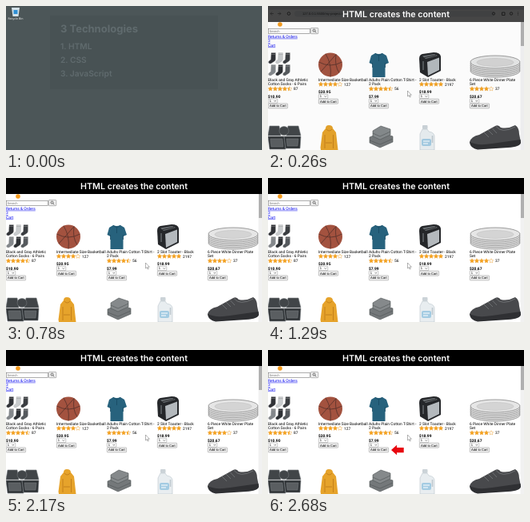
Recreate the animation shown at these times as an HTML page. Size 320 by 180 pixels, loop 2.81 s.

```html
<!DOCTYPE html>
<html lang="en">
<head>
<meta charset="utf-8">
<title>HTML creates the content</title>
<style>
html, body { margin: 0; width: 100%; height: 100%; overflow: hidden; background: #4c5658; }
svg { display: block; width: 100%; height: 100%; }
text { font: 4.9px Roboto, sans-serif; text-rendering: geometricPrecision; }
.title { font: 600 10.7px Inter, sans-serif; fill: #fff; text-anchor: middle; }
.slide { font: 600 10.2px Inter, sans-serif; fill: #606b6e; }
.slide.head { font-size: 13px; font-weight: 700; }
.link { fill: #00e; text-decoration: underline; }
.price { font-weight: 700; }
.ui { font: 4.1px "Liberation Sans", Arial, sans-serif; }
.icon { font: 3.6px "Open Sans", sans-serif; fill: #fff; text-anchor: middle; }
</style>
</head>
<body>
<svg viewBox="0 0 320 180" preserveAspectRatio="none">
  <rect width="320" height="180" fill="#4c5658"/>
  <g id="slide">
    <rect x="55" y="12" width="210" height="92" fill="#485254"/>
    <text class="slide head" x="68" y="33">3 Technologies</text>
    <text class="slide" x="68" y="54">1. HTML</text>
    <text class="slide" x="68" y="71">2. CSS</text>
    <text class="slide" x="68" y="88">3. JavaScript</text>
  </g>
  <path d="M7 2H17L15.500 13H8.500Z" fill="#d3e1e8"/>
  <rect x="9.500" y="5" width="5" height="5" fill="#2f8fd4"/>
  <text class="icon" x="12" y="17.200">Recycle Bin</text>

  <g id="page" opacity="0">
    <rect width="320" height="180" fill="#fff"/>
    <rect width="320" height="20" fill="#dee1e6"/>
    <rect y="4.500" width="320" height="15.500" fill="#fff"/>
    <rect x="33" y="6" width="250" height="7.500" rx="3.700" fill="#eceff2"/>
    <text class="ui" x="43" y="11.300" fill="#444">127.0.0.1:5500/my-project.html</text>
    <path d="M7 9.500H3M5 7.500L3 9.500L5 11.500M12 9.500H16M14 7.500L16 9.500L14 11.500" fill="none" stroke="#777" stroke-width=".7"/>
    <g fill="none" stroke="#444" stroke-width=".8"><circle cx="26" cy="9.500" r="1.800"/><circle cx="282" cy="9.500" r="1.600"/><path d="M292.500 8H296V11.500H292.500Z"/><circle cx="304" cy="9.500" r="1.700"/><path d="M312.500 7.500V11.500" stroke-dasharray=".8"/></g>
    <rect x="315.500" y="20" width="4.500" height="160" fill="#f1f1f1"/>
    <rect x="316" y="20" width="4" height="30" fill="#b0b0b0"/>
    <circle cx="15" cy="23" r="2.800" fill="#f59a1b"/>

    <rect x=".3" y="28.300" width="52" height="6.300" fill="#fff" stroke="#777" stroke-width=".6"/>
    <text class="ui" x="1.500" y="33" fill="#757575">Search</text>
    <rect x="53.300" y="27.500" width="9.500" height="7.200" rx=".8" fill="#efefef" stroke="#777" stroke-width=".5"/>
    <g fill="none" stroke="#333" stroke-width=".7"><circle cx="57.600" cy="30.600" r="1.500"/><path d="M58.700 31.700L60.300 33.300"/></g>
    <text class="link" x="0" y="39.700">Returns &amp; Orders</text>
    <text class="link" x="0" y="45.300">3</text>
    <text class="link" x="0" y="50.600">Cart</text>

    <g id="products"></g>

    <g id="socks"></g>

    <circle cx="78" cy="73.500" r="15" fill="#a3523f"/>
    <path d="M63.500 70Q78 78 92.500 70M66 82Q77 70 85 60.500M72 59.800Q80 73 78 88.500M85 60.500Q83 75 89 83.500" fill="none" stroke="#55302a" stroke-width=".8"/>

    <path d="M134 59Q138.500 61 143 59L148 62L151 71L146.500 73V89H130.500V73L126.500 71L129 62Z" fill="#27627d"/>
    <path d="M134 59Q138.500 64 143 59M138.500 62V69M130.500 71V77M146.500 71V77" fill="none" stroke="#174a62" stroke-width=".8"/>

    <path d="M189 66Q189 61 193 60L207 58Q215 58 216 63V81L200 89L190 83Z" fill="#25272a"/>
    <path d="M193 62.500L208 60L212 62L197 66Z" fill="#6b7074"/>
    <path d="M199 70L214 64.500V80L200 87Z" fill="#b4b9bd"/>
    <path d="M195.500 64.500L210 61.500" stroke="#222" stroke-width=".9"/>
    <path d="M194 69V80" stroke="#8b9094" stroke-width=".9"/>

    <g id="plates"></g>

    <g stroke="#73787b" stroke-width=".6" fill="#414548">
      <path d="M2 150H14L16 162H0ZM25 150H38L41 162H23Z"/>
      <ellipse cx="20" cy="156" rx="6" ry="5.500"/>
      <path d="M0 163H20L22 179H2ZM20 163H41L40 178H22Z" fill="#2f3336"/>
      <path d="M3 166H18L19 176H4ZM23 166H38L37 175H24Z" fill="#5a5e61"/>
    </g>

    <path d="M72 153Q72 149 76 149Q81 149 81 153L85 158L87.500 180H66L65.500 177L68 158Z" fill="#e6a32b"/>
    <path d="M73 154Q76.500 158 80 154M71 161V178M81.500 161V178M72 171H80" fill="none" stroke="#bc7817" stroke-width=".8"/>

    <g fill="#74787a" stroke="#505457" stroke-width=".6" stroke-linejoin="round">
      <path d="M127 164L142 158L156 163V170L140 177L127 171Z"/>
      <path d="M131 156L141 150L153 154V161L140 167L131 163Z" fill="#85898b"/>
      <path d="M127 168L140 173L156 166M131 159L140 163L153 157" fill="none"/>
    </g>

    <path d="M193 154H199L201 157Q209 158 208 165V180H190V160Z" fill="#e8edf0" stroke="#b9c4cb" stroke-width=".6"/>
    <rect x="193" y="149" width="6.500" height="5" rx="1" fill="#cbd3d8"/>
    <rect x="192" y="166" width="12" height="9" rx="2" fill="#a3cbe2"/>
    <path d="M194 169H202M194 172H200" stroke="#fff"/>
    <path d="M205.500 162V171" stroke="#bec9cf" stroke-width="1.600"/>

    <path d="M252 170Q254 163 264 161L284 150Q288 148 291 152Q300 154 309 149Q314 152 314 160L316 170Q315 175 300 176L262 179Q253 177 252 170Z" fill="#48494c"/>
    <path d="M252 170Q262 175 280 172L315.500 167L316 171Q315 176 300 177L262 179.500Q253 178 252 170Z" fill="#2f3033"/>
    <path d="M285 150.500Q292 160 309 151M270 158L276 164M275 155L281 161M280 152.500L286 159" fill="none" stroke="#76797c" stroke-width=".8"/>

    <path d="M174.500 106V113L176.100 111.600L177.200 114L178.300 113.500L177.200 111.200H179.400Z" fill="#fff" stroke="#666" stroke-width=".5"/>
    <path id="arrow" opacity="0" d="M154 125L161 118.800V122H169.700V128.200H161V131.200Z" fill="#e8060f"/>
  </g>

  <rect id="bar" width="320" height="20" opacity="0"/>
  <text id="title" class="title" x="160" y="13.500" opacity="0">HTML creates the content</text>
</svg>
<script>
const $ = id => document.getElementById(id);
const LOOP = 2810;

const products = [
  { lines: ["Black and Gray Athletic", "Cotton Socks - 6 Pairs"], stars: 4.5, votes: 87, price: "$10.90" },
  { lines: ["Intermediate Size Basketball"], stars: 4, votes: 127, price: "$20.95" },
  { lines: ["Adults Plain Cotton T-Shirt -", "2 Pack"], stars: 4.5, votes: 56, price: "$7.99" },
  { lines: ["2 Slot Toaster - Black"], stars: 5, votes: 2197, price: "$18.99" },
  { lines: ["6 Piece White Dinner Plate", "Set"], stars: 4, votes: 37, price: "$20.67" }
];

function starPath(cx, cy) {
  const corners = Array.from({ length: 10 }, (_, i) => {
    const angle = i * Math.PI / 5 - Math.PI / 2, r = i % 2 ? 1.35 : 2.9;
    return `${cx + r * Math.cos(angle)} ${cy + r * Math.sin(angle)}`;
  });
  return `M${corners.join("L")}Z`;
}

function starRow(x, y, rating) {
  return Array.from({ length: 5 }, (_, i) => {
    const path = starPath(x + 3 + i * 6, y), amount = rating - i;
    const fill = amount >= 1 ? "#f6a21b" : "#fff";
    const half = amount === 0.5
      ? `<path d="${path}" fill="#f6a21b" clip-path="inset(0 50% 0 0)"/>` : "";
    return `<path d="${path}" fill="${fill}" stroke="#e89418" stroke-width=".4"/>${half}`;
  }).join("");
}

function productCard({ lines, stars, votes, price }, column) {
  const x = column * 63, y = 93.6 + (lines.length - 1) * 5.7;
  return lines.map((line, i) => `<text x="${x}" y="${93.6 + i * 5.7}">${line}</text>`).join("") +
    starRow(x, y + 4.3, stars) +
    `<text x="${x + 32}" y="${y + 6}">${votes}</text>
     <text class="price" x="${x}" y="${y + 15.2}">${price}</text>
     <rect x="${x + .3}" y="${y + 16.7}" width="11.5" height="5.3" rx=".7" fill="#fff" stroke="#777" stroke-width=".4"/>
     <text class="ui" x="${x + 1.8}" y="${y + 20.8}">1</text>
     <path d="M${x + 7.5} ${y + 18.7}l1.300 1.300l1.300 -1.300" fill="none" stroke="#333" stroke-width=".6"/>
     <rect x="${x + .3}" y="${y + 22.6}" width="24.3" height="6" rx=".8" fill="#efefef" stroke="#777" stroke-width=".4"/>
     <text class="ui" x="${x + 2}" y="${y + 27}">Add to Cart</text>`;
}
$("products").innerHTML = products.map(productCard).join("");

const sockColors = ["#303237", "#c9ccce", "#3a3d41", "#83878b", "#2d3034", "#55595d"];
$("socks").innerHTML = sockColors.map((color, i) => {
  const x = 4 + i % 3 * 9, y = 58.5 + Math.floor(i / 3) * 15;
  return `<path d="M${x} ${y}h5.500v8q0 2 -2 3l-4 2.500q-3 .5 -3 -2q0 -1 3 -3z" fill="${color}" stroke="#aaa" stroke-width=".3"/>
    <path d="M${x} ${y + 2}h5.500" stroke="#999" stroke-width=".5"/>`;
}).join("");

$("plates").innerHTML = Array.from({ length: 6 }, (_, i) =>
  `<ellipse cx="284" cy="${81 - i * 2.2}" rx="31" ry="8" fill="#e6e6e6" stroke="#777" stroke-width=".7"/>`
).join("") + `<ellipse cx="284" cy="70.500" rx="23" ry="5" fill="#d4d4d4" stroke="#bbb" stroke-width=".5"/>`;

// Fades advance in 130 ms steps.
const at = (levels, step) => step < 0 ? 0 : levels[Math.min(step, levels.length - 1)];
const setOpacity = (id, value) => $(id).setAttribute("opacity", value);

function draw(t) {
  const step = Math.floor(t / 130);
  setOpacity("slide", at([1, 0], step));
  setOpacity("page", at([0, .52, .98, 1], step));
  setOpacity("bar", at([0, .14, .72, .95, 1], step));
  setOpacity("title", at([0, .85, 1], step));
  setOpacity("arrow", at([.35, .8, 1], Math.floor((t - 2420) / 130)));
}

const start = performance.now();
function tick() {
  draw((performance.now() - start) % LOOP);
  requestAnimationFrame(tick);
}
tick();
</script>
</body>
</html>
```
